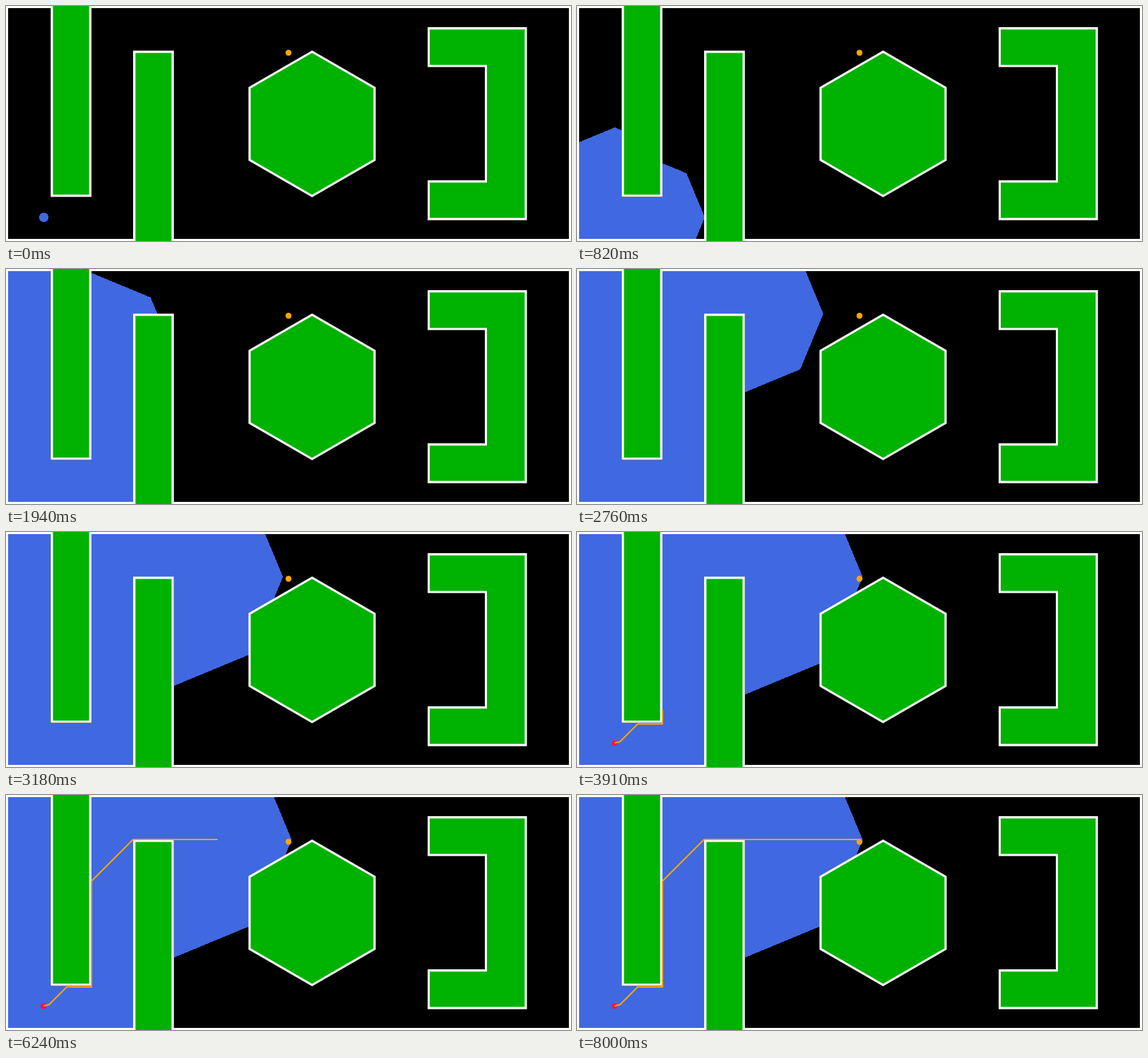
Recreate the animation shown at these times as an HTML page with a canvas. Size 800 px wide and 333 px high, loop 8030 ms.

```html
<!DOCTYPE html>
<html lang="en">
<head>
<meta charset="utf-8">
<title>Shortest path search</title>
<style>
html, body { margin: 0; width: 100%; height: 100%; overflow: hidden; background: #fff; }
canvas { display: block; width: 800px; height: 333px; }
</style>
</head>
<body>
<canvas id="stage" width="800" height="333"></canvas>
<script>
const W = 800, H = 333, LOOP = 8030, EDGE = 3;
const START = [53, 299], GOAL = [400, 66.3];
const GREEN = '#00b200', ORANGE = '#ffa500';
const ctx = document.getElementById('stage').getContext('2d');

const isFree = (x, y) => {
  if (x < EDGE || x >= W - EDGE || y < EDGE || y >= H - EDGE) return false;
  if (x >= 63 && x < 121 && y < 271) return false;
  if (x > 180 && x < 238 && y > 63) return false;
  const dx = Math.abs(x - 433.5), dy = Math.abs(y - 167);
  return dx > 90 || dy + dx / Math.sqrt(3) > 104;
};

// Eight-neighbour distance from the start, relaxed by alternating sweeps.
function distanceField() {
  const dist = new Float32Array(W * H).fill(Infinity);
  const free = new Uint8Array(W * H);
  for (let i = 0; i < free.length; i++) free[i] = isFree(i % W, Math.floor(i / W));
  dist[START[1] * W + START[0]] = 0;
  const sweep = dir => {
    let changed = false;
    for (let n = 0; n < free.length; n++) {
      const i = dir > 0 ? n : free.length - 1 - n;
      if (!free[i]) continue;
      const up = i - dir * W;
      const best = Math.min(dist[i - dir] + 1, dist[up] + 1,
        Math.min(dist[up - 1], dist[up + 1]) + Math.SQRT2);
      if (best < dist[i] - 1e-3) {
        dist[i] = best;
        changed = true;
      }
    }
    return changed;
  };
  let more = true;
  while (more) {
    const forward = sweep(1), backward = sweep(-1);
    more = forward || backward;
  }
  return dist;
}

const dist = distanceField();
const order = dist.filter(Number.isFinite).sort();
const countWithin = d => {
  let lo = 0, hi = order.length;
  while (lo < hi) {
    const mid = (lo + hi) >> 1;
    if (order[mid] <= d) lo = mid + 1; else hi = mid;
  }
  return lo;
};

// Cells are visited at an almost constant rate: [time, cells visited].
const pace = [[0, 6.3], [820, 127.3], [1940, 344.5], [2760, 479], [3285, 534.8]]
  .map(([t, d]) => [t, countWithin(d)]);

function reach(t) {
  for (let i = 1; i < pace.length; i++) {
    const [t0, n0] = pace[i - 1], [t1, n1] = pace[i];
    if (t < t1) return order[Math.floor(n0 + (n1 - n0) * (t - t0) / (t1 - t0))];
  }
  return 534.8;
}

const layer = document.createElement('canvas');
layer.width = W;
layer.height = H;
const layerCtx = layer.getContext('2d');
const image = layerCtx.createImageData(W, H);
const pixels = new Uint32Array(image.data.buffer);
const BLUE = 0xffe06840; // ABGR

function drawExplored(t) {
  const limit = reach(t);
  for (let i = 0; i < pixels.length; i++) pixels[i] = dist[i] <= limit ? BLUE : 0;
  layerCtx.putImageData(image, 0, 0);
  ctx.drawImage(layer, 0, 0);
}

function poly(points, fill) {
  ctx.beginPath();
  points.forEach(([x, y]) => ctx.lineTo(x, y));
  ctx.fillStyle = fill;
  ctx.fill();
}

function rect(x0, y0, x1, y1, fill) {
  ctx.fillStyle = fill;
  ctx.fillRect(x0, y0, x1 - x0, y1 - y0);
}

function dot([x, y], r, fill) {
  ctx.beginPath();
  ctx.arc(x, y, r, 0, Math.PI * 2);
  ctx.fillStyle = fill;
  ctx.fill();
}

const hexagon = r => Array.from({ length: 6 }, (_, i) => {
  const a = (i + 0.5) * Math.PI / 3;
  return [433.4 + r * Math.cos(a), 167 + r * Math.sin(a)];
});

const bracket = (l, t, r, b, inX, inT, inB) =>
  [[l, t], [r, t], [r, b], [l, b], [l, inB], [inX, inB], [inX, inT], [l, inT]];

function drawObstacles() {
  rect(63.3, 0, 121, 270.5, '#fff');
  rect(66.5, 0, 117.7, 267.3, GREEN);
  rect(180, 63.3, 237.7, H, '#fff');
  rect(183.3, 66.5, 234.4, H, GREEN);
  poly(hexagon(104), '#fff');
  poly(hexagon(100.4), GREEN);
  poly(bracket(597, 30, 737.6, 303.4, 678, 86.6, 247), '#fff');
  poly(bracket(600, 33.2, 734.4, 300.2, 681, 83.4, 250.2), GREEN);
}

const route = [[53.5, 299], [61, 297], [86, 272], [121, 272], [121, 122],
  [180, 63], [398, 63], [400, 66]];

function drawRoute(t) {
  dot(START, 4, '#f0144e');
  let left = 87 + 0.1326 * (t - 3910);
  ctx.beginPath();
  ctx.moveTo(...route[0]);
  for (let i = 1; i < route.length && left > 0; i++) {
    const [x0, y0] = route[i - 1], [x1, y1] = route[i];
    const len = Math.max(Math.abs(x1 - x0), Math.abs(y1 - y0));
    const k = Math.min(1, left / len);
    ctx.lineTo(x0 + (x1 - x0) * k, y0 + (y1 - y0) * k);
    left -= len;
  }
  ctx.strokeStyle = ORANGE;
  ctx.lineWidth = 2;
  ctx.lineJoin = 'round';
  ctx.stroke();
}

function draw(t) {
  rect(0, 0, W, H, '#fff');
  rect(EDGE, EDGE, W - EDGE, H - EDGE, '#000');
  drawExplored(t);
  drawObstacles();
  if (t >= 3290) drawRoute(t);
  dot(GOAL, 4.2, ORANGE);
}

const began = performance.now();
function tick() {
  draw((performance.now() - began) % LOOP);
  requestAnimationFrame(tick);
}
tick();
</script>
</body>
</html>
```
